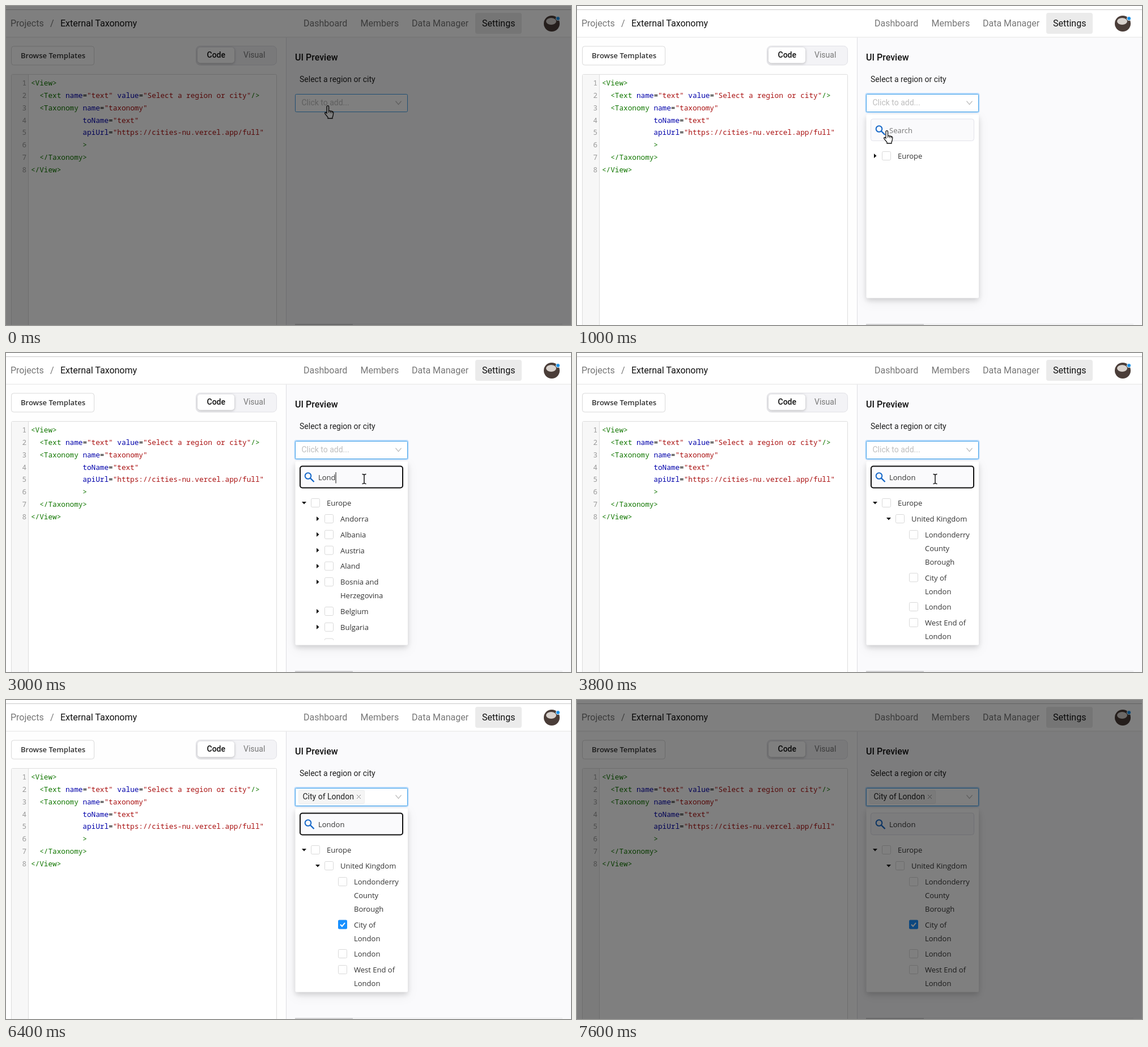
An HTML page that plays this animation: 997 by 562 pixels, repeating every 7800 ms.

```html
<!DOCTYPE html>
<html lang="en">
<head>
<meta charset="utf-8">
<title>External Taxonomy</title>
<style>
html, body { margin: 0; width: 100%; height: 100%; overflow: hidden; background: #fff; }
svg { display: block; }
text { white-space: pre; font: 14px Roboto, sans-serif; fill: #1f1f1f; }
.nav { font-size: 16px; fill: #777; }
.on { fill: #111; }
.medium { font-weight: 500; }
.tree { font: 13px "Open Sans", sans-serif; fill: #333; }
.code { font: 12.7px "Noto Sans Mono", monospace; fill: #000; }
.num { fill: #999; text-anchor: end; }
.tag { fill: #170; }
.attr { fill: #00a; }
.str { fill: #a11; }
.raised { filter: drop-shadow(0 1px 2px #0004); }
.panel { filter: drop-shadow(0 4px 5px #0002) drop-shadow(0 6px 9px #0001); }
</style>
</head>
<body>
<svg id="stage" width="997" height="562" viewBox="0 0 997 562"></svg>
<script>
const rect = (x, y, w, h, fill, stroke = 'none', r = 0, more = '') =>
  `<rect x="${x}" y="${y}" width="${w}" height="${h}" rx="${r}" fill="${fill}" stroke="${stroke}" ${more}/>`;
const text = (x, y, s, cls = '') => `<text x="${x}" y="${y}" class="${cls}">${s}</text>`;
const path = (d, stroke, w = 1, fill = 'none') =>
  `<path d="${d}" stroke="${stroke}" stroke-width="${w}" fill="${fill}"/>`;
const group = (id, body, more = '') => `<g id="${id}" ${more}>${body}</g>`;

const source = `<View>
  <Text name="text" value="Select a region or city"/>
  <Taxonomy name="taxonomy"
            toName="text"
            apiUrl="https://cities-nu.vercel.app/full"
            >
  </Taxonomy>
</View>`;

function paint(line) {
  return line.replace(/"[^"]*"|<\/?\w+|\/?>|\w+(?==)/g, s => {
    const cls = s[0] === '"' ? 'str' : /[<>]/.test(s) ? 'tag' : 'attr';
    return `<tspan class="${cls}">${s.replace(/</g, '&lt;').replace(/>/g, '&gt;')}</tspan>`;
  });
}

const code = source.split('\n').map((line, i) => {
  const y = 140 + 21.86 * i;
  return text(36, y, i + 1, 'code num') + text(44, y, paint(line), 'code');
}).join('');

// One tree row: depth sets the indent, arrow is 'down', 'right' or empty
function row(y, depth, arrow, ...lines) {
  const x = 546 + 24 * depth;
  const mark = arrow === 'down' ? `M${x - 24} ${y - 2}h8l-4 4.5Z`
    : arrow ? `M${x - 22} ${y - 4}v8l4.5 -4Z` : '';
  return path(mark, 'none', 0, '#111')
    + rect(x - 7.5, y - 7.5, 15, 15, '#fff', '#d9d9d9', 2)
    + lines.map((s, i) => text(x + 20, y + 5 + 24 * i, s, 'tree')).join('');
}

const countries = ['Andorra', 'Albania', 'Austria', 'Aland', 'Bosnia and|Herzegovina',
  'Belgium', 'Bulgaria', 'Belarus'];
let rowY = 292;
const countryRows = countries.map(name => {
  const lines = name.split('|');
  const html = row(rowY, 1, 'right', ...lines);
  rowY += 27.8 + 24 * (lines.length - 1);
  return html;
}).join('');

const results = row(292, 1, 'down', 'United Kingdom')
  + row(320, 2, '', 'Londonderry', 'County', 'Borough')
  + row(395.5, 2, '', 'City of', 'London')
  + row(447, 2, '', 'London')
  + row(475, 2, '', 'West End of', 'London');

const header = rect(0, 0, 997, 55, '#fff')
  + rect(0, 6, 997, 1, '#c8c8c8') + rect(0, 54.5, 997, 1, '#e3e3e3')
  + text(8, 36, 'Projects', 'nav') + text(78, 36, '/', 'nav')
  + text(96, 36, 'External Taxonomy', 'nav on')
  + rect(828, 12, 82, 37, '#ebebeb', 'none', 4)
  + [[525, 'Dashboard'], [625.5, 'Members'], [716, 'Data Manager']]
    .map(([x, s]) => text(x, 36, s, 'nav')).join('')
  + text(840, 36, 'Settings', 'nav on')
  + '<circle cx="963" cy="31" r="14" fill="#4a3d38"/>'
  + '<ellipse cx="962" cy="27" rx="9" ry="6" fill="#d8d2cd"/>'
  + '<circle cx="974" cy="22" r="3.5" fill="#1890e8" stroke="#fff"/>';

const left = rect(9.5, 71, 146, 33, '#fff', '#d9d9d9', 4)
  + `<text x="26" y="92" class="tree" style="font-weight:600">Browse Templates</text>`
  + rect(335.5, 70.5, 142, 33.5, '#f3f3f6', '#e1e1e6', 7)
  + rect(338, 73, 65, 27.5, '#fff', 'none', 5, 'class="raised"')
  + text(354.5, 91, 'Code', 'medium on') + text(419, 91, 'Visual', 'nav" style="font-size:14px')
  + rect(9.5, 120.5, 468, 460, '#fff', '#ddd', 2)
  + rect(10, 121, 29, 445, '#f7f7f7') + rect(39, 121, 1, 445, '#ddd') + code;

const right = rect(494, 55.5, 503, 507, '#fafafc') + rect(494, 55.5, 1, 507, '#dedee2')
  + rect(510, 560, 472, 1, '#e6e6e8') + rect(510, 560, 102, 2, '#d0d0d2')
  + text(510, 96, 'UI Preview', 'nav medium on')
  + text(518, 134, 'Select a region or city')
  + group('glow', rect(509.5, 154, 200, 33.5, 'none', '#1890ff44', 3, 'stroke-width="2"'))
  + rect(510.5, 155.5, 198, 31, '#fff', '#40a0e8', 2)
  + path('M687.5 167.5l5 6 5 -6', '#bfbfbf', 1.2)
  + group('hint', '<text x="521.5" y="175" style="fill:#bfbfbf">Click to add...</text>')
  + group('chip', rect(516.5, 159, 116, 23.5, '#f5f5f5', '#eee', 2)
    + text(523.5, 175, 'City of London') + path('M619 167l7 7m0 -7l-7 7', '#888'));

const popup = rect(510.5, 191, 198.5, 323.5, '#fff', 'none', 2, 'class="panel"')
  + rect(518.5, 199, 182, 38.5, '#fafafc', '#e2e2ea', 4)
  + group('focus', rect(519, 199.5, 181, 38, 'none', '#111', 4, 'stroke-width="2"'))
  + '<circle cx="533" cy="216.5" r="5.3" fill="none" stroke="#1668c8" stroke-width="2"/>'
  + path('M537 220.5l6.5 6.5', '#1668c8', 2.4)
  + '<text id="query" x="551" y="224" class="tree"></text>'
  + '<rect id="caret" y="210" width="1" height="19.5" fill="#111"/>'
  + '<g clip-path="url(#list)">'
  + group('hoverCity', rect(609.5, 383.5, 95, 48, '#f3f3f3'))
  + group('hoverLondon', rect(609.5, 435, 56, 24, '#f3f3f3'))
  + row(264, 0, 'down', 'Europe')
  + group('folded', rect(520, 258, 13, 13, '#fff') + path('M524 260v8l4.5 -4Z', 'none', 0, '#111'))
  + group('countries', countryRows) + group('results', results)
  + group('tick', rect(586, 387.5, 16, 16, '#1890ff', 'none', 2)
    + path('M590 395.5l3 3.2 5 -6', '#fff', 2))
  + '</g>';

const handPath = 'M-2 1.5a1.8 1.8 0 0 1 3.6 0V8.5l5.2 1q3 .6 3 3l-.8 5q-.3 1.5-1 2V22H0V20'
  + 'l-5-6q-1-2.5 1-2.5L-2 13Z';
const pointer = group('hand', path(handPath, '#111', 1.3, '#fff')
    + path('M1.6 8v4M4.5 9.5v3M7.2 10v3', '#111'))
  + group('beam', path('M-3.5 -8.5q2.5 0 3.5 1.2q1 -1.2 3.5 -1.2M0 -7.5v15M-3.5 8.5q2.5 0 3.5 -1.2q1 1.2 3.5 1.2', '#111', 1.5))
  + group('arrow', path('M0 0v16l3.8 -3.6 2.6 6 2.6 -1.2 -2.6 -5.8h5.2Z', '#111', 1, '#fff'));

const $ = id => document.getElementById(id);
$('stage').innerHTML = '<clipPath id="list"><rect x="511" y="250" width="198" height="256"/></clipPath>'
  + rect(0, 0, 997, 562, '#fefefe') + left + right + header
  + group('popup', popup) + group('pointer', pointer)
  + group('shade', rect(0, 0, 997, 562, '#000', 'none', 0, 'opacity=".5"'));

const show = (id, on) => $(id).style.display = on ? '' : 'none';

// Pointer stops: time, x, y
const stops = [[0, 568, 176], [800, 568, 176], [1200, 526, 264], [1400, 526, 264],
  [2000, 632, 222], [4000, 632, 222], [4600, 645, 300], [5000, 630, 451], [5200, 628, 448],
  [5400, 622, 424], [5600, 595, 396], [5800, 595, 396], [6000, 650, 450], [6400, 768, 561]];

function place(t) {
  const i = stops.findIndex(s => s[0] > t);
  const [t0, x0, y0] = stops[i - 1], [t1, x1, y1] = stops[i];
  const k = (t - t0) / (t1 - t0);
  return [x0 + (x1 - x0) * k, y0 + (y1 - y0) * k];
}

function draw(now) {
  // The screen refreshes five times a second
  const t = Math.floor(now % 7800 / 200) * 200;
  const open = t >= 600, picked = t >= 5800;
  const focused = t >= 2000 && t < 7000;
  const typed = 'London'.slice(0, Math.max(0, (t - 2200) / 200));

  show('shade', t < 200 || t >= 7600);
  show('glow', open);
  show('popup', open);
  show('hint', !picked);
  show('chip', picked);
  show('tick', picked);
  show('focus', focused);
  show('folded', t < 1400);
  show('countries', t >= 1400 && t < 3400);
  show('results', t >= 3600);
  show('hoverLondon', t >= 5000 && t < 5400);
  show('hoverCity', t === 5400);

  $('query').textContent = typed || 'Search';
  $('query').style.fill = typed ? '#333' : '#777';
  $('caret').setAttribute('x', typed ? 551 + $('query').getComputedTextLength() : 551);
  show('caret', focused && (t < 3600 || Math.floor((t - 3000) / 600) % 2 === 0));

  show('pointer', t < 6400);
  if (t < 6400) {
    const [x, y] = place(t);
    $('pointer').setAttribute('transform', `translate(${x} ${y})`);
  }
  const beam = t >= 1800 && t <= 4000, arrow = t >= 6000;
  show('beam', beam);
  show('arrow', arrow);
  show('hand', !beam && !arrow);
}

function tick(now) {
  draw(now);
  requestAnimationFrame(tick);
}
draw(0);
requestAnimationFrame(tick);
</script>
</body>
</html>
```
